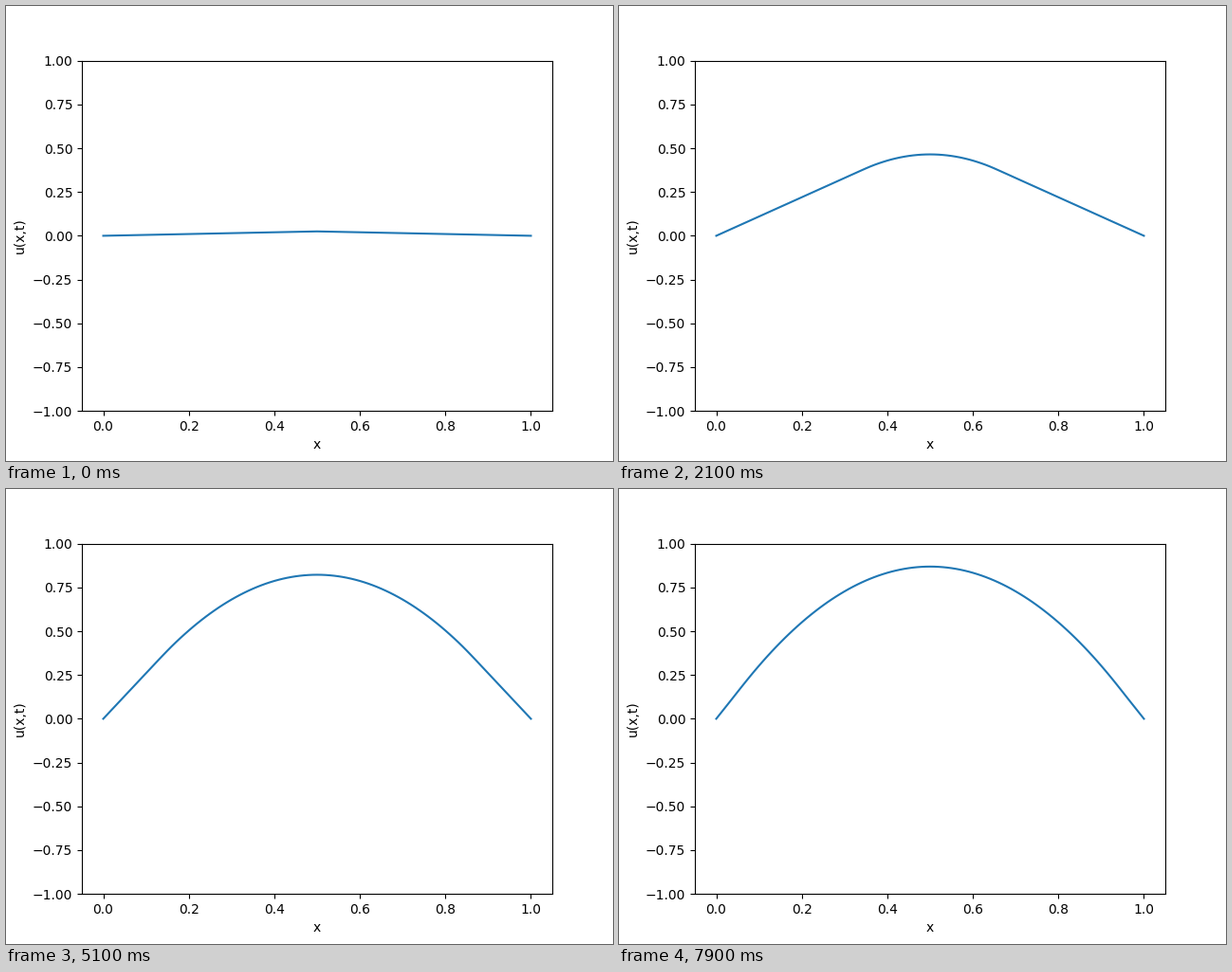
These frames come from a looping animation (640 by 480 pixels, 8000 ms). A matplotlib script:

```python
import numpy as np
import matplotlib.pyplot as plt
from matplotlib.animation import FuncAnimation

FRAMES = 80
DX, DT = 0.01, 0.005
C2 = 2.0  # squared wave speed


def solve(x, velocity, steps):
    """Leapfrog solution of u_tt = C2 * u_xx, starting flat with fixed ends."""
    r = C2 * (DT / DX) ** 2
    prev, cur = np.zeros_like(x), DT * velocity
    states = [cur]
    for _ in range(steps - 1):
        nxt = np.zeros_like(x)
        nxt[1:-1] = (2 * cur[1:-1] - prev[1:-1]
                     + r * (cur[2:] - 2 * cur[1:-1] + cur[:-2]))
        prev, cur = cur, nxt
        states.append(cur)
    return states


x = np.linspace(0, 1, round(1 / DX) + 1)
states = solve(x, 10 * np.minimum(x, 1 - x), FRAMES)

fig, ax = plt.subplots(figsize=(6.4, 4.8), dpi=100)
line, = ax.plot(x, states[0])
ax.set_ylim(-1, 1)
ax.set_xlabel("x")
ax.set_ylabel("u(x,t)")


def update(i):
    line.set_ydata(states[i])
    return line,


anim = FuncAnimation(fig, update, frames=FRAMES, interval=100,
                     repeat=True, repeat_delay=0)
plt.show()
```
